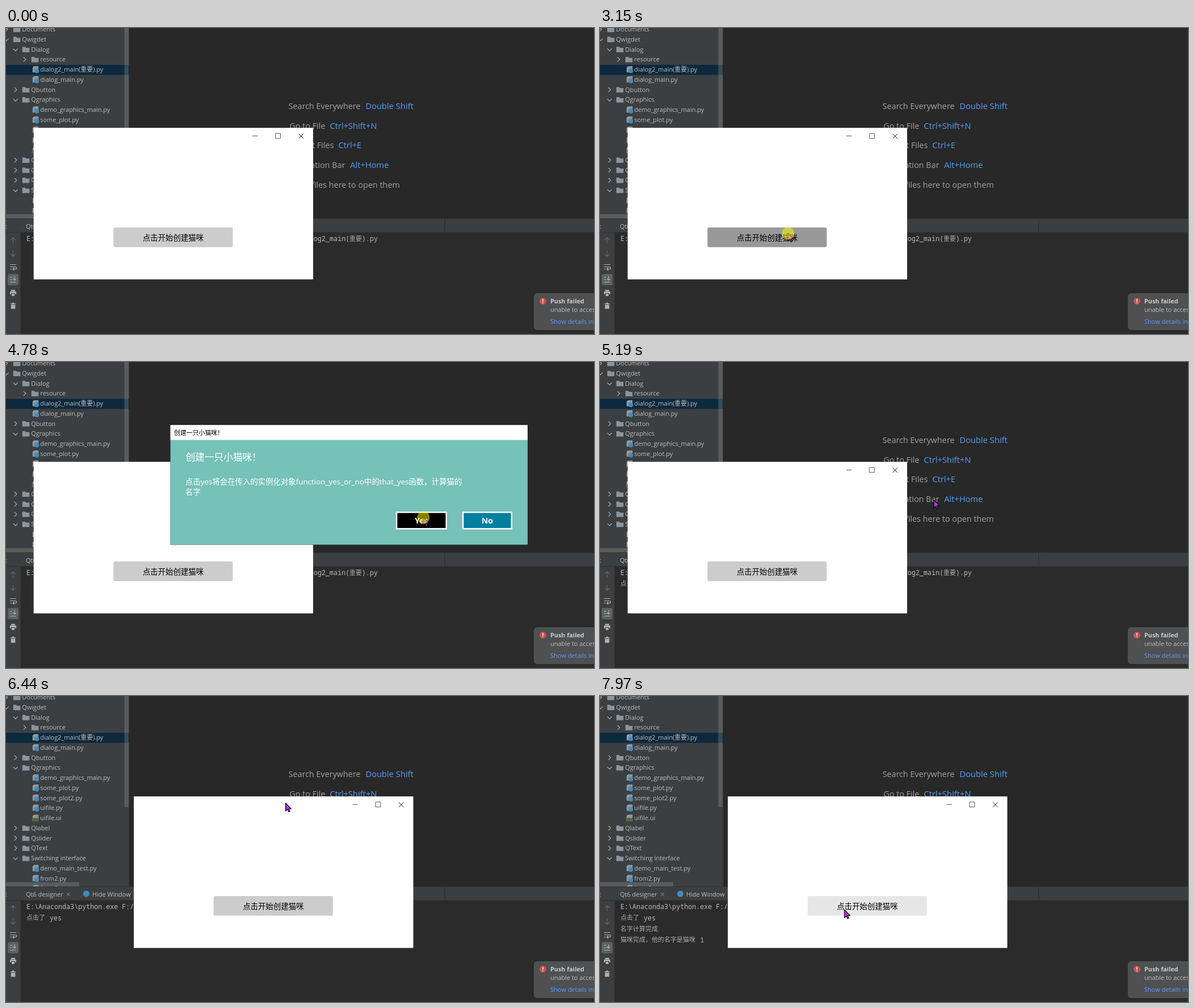
An HTML page that plays this animation: 1036x540 px, repeating every 8000 ms.

```html
<!DOCTYPE html>
<html lang="zh">
<head>
<meta charset="utf-8">
<style>
html, body { margin: 0; height: 100%; overflow: hidden; background: #282828; }
svg { display: block; width: 1036px; height: 540px; font-family: "Open Sans", "Noto Sans CJK SC", "Noto Sans CJK", sans-serif; }
text { white-space: pre; }
.mono { font-family: "Noto Sans Mono", "Noto Sans CJK SC", monospace; }
.bold { font-weight: 700; }
.end { text-anchor: end; }
.mid { text-anchor: middle; }
.line { fill: none; stroke: #afb1b3; stroke-width: 1.2; }
#ghost { mix-blend-mode: difference; }
</style>
</head>
<body>
<svg id="stage" viewBox="0 0 1036 540"></svg>
<script>
const rect = (x, y, w, h, fill, more = '') =>
  `<rect x="${x}" y="${y}" width="${w}" height="${h}" fill="${fill}" ${more}/>`;
const path = (d, fill, more = '') => `<path d="${d}" fill="${fill}" ${more}/>`;
const line = (d, more = '') => `<path d="${d}" class="line" ${more}/>`;
// y is the vertical middle of the line
const text = (x, y, s, size = 10.95, fill = '#bbb', cls = '') =>
  `<text x="${x}" y="${y + size * .36}" font-size="${size}" fill="${fill}" class="${cls}">${s}</text>`;

// Project tree: [level, kind, label]; v/> are open/closed folders
const rows = [
  [0, '>', 'Documents'], [0, 'v', 'Qwigdet'], [1, 'v', 'Dialog'], [2, '>', 'resource'],
  [2, 'py', 'dialog2_main(重要).py'], [2, 'py', 'dialog_main.py'], [1, '>', 'Qbutton'],
  [1, 'v', 'Qgraphics'], [2, 'py', 'demo_graphics_main.py'], [2, 'py', 'some_plot.py'],
  [2, 'py', 'some_plot2.py'], [2, 'py', 'uifile.py'], [2, 'ui', 'uifile.ui'],
  [1, '>', 'Qlabel'], [1, '>', 'Qslider'], [1, '>', 'QText'], [1, 'v', 'Switching interface'],
  [2, 'py', 'demo_main_test.py'], [2, 'py', 'from2.py'], [2, 'py', 'from3.py']
];

function treeRow([level, kind, label], i) {
  const x = 28.3 + level * 16, y = 2.3 + i * 17.75;
  let icon;
  if (kind.length === 1) {
    const cx = x - 28;
    icon = path(`M${x - 15.5} ${y - 4.5}h5l1.5 1.8h6v7.7h-12.5z`, '#8b959d') +
      line(kind === 'v' ? `M${cx - 3.5} ${y - 1.5}l4 4 4-4` : `M${cx - 1.5} ${y - 4}l4 4-4 4`);
  } else {
    icon = path(`M${x - 10} ${y - 6}h7v11h-10.5v-7.5z`, '#8b959d') +
      path(`M${x - 13.5} ${y - 3}l3-3v3z`, '#b4bcc2') +
      (kind === 'py' ? `<circle cx="${x - 6}" cy="${y + 2.5}" r="4" fill="#3e8cc0"/>`
        : rect(x - 14.5, y, 12, 6, '#4f6b3c'));
  }
  return icon + text(x, y, label);
}

const hints = [
  [624.5, 633.5, 'Search Everywhere', 'Double Shift'], [562.5, 570.5, 'Go to File', 'Ctrl+Shift+N'],
  [577.5, 585.5, 'Recent Files', 'Ctrl+E'], [597.5, 606.3, 'Navigation Bar', 'Alt+Home'],
  [693.8, 0, 'Drop files here to open them', '']
].map(([end, start, label, keys], i) =>
  text(end, 138 + i * 34.6, label, 14.35, '#a2a2a2', 'end') +
  text(start, 138 + i * 34.6, keys, 14.7, '#589df6')).join('');

// Scroll bars are translucent, so the selected row shows through
const bar = 'fill-opacity=".28"';
const tree = rect(0, 0, 217, 337, '#3c3f41') + rect(0, 65, 217, 17.7, '#0d293e') +
  rows.map(treeRow).join('') +
  rect(208.5, 0, 7.5, 196, '#a6a6a6', bar) + rect(0, 328.5, 129, 7.5, '#a6a6a6', bar);

const tools = rect(0, 336.5, 1036, 204, '#2b2b2b') + rect(0, 336.5, 1036, 24, '#3c3f41') +
  rect(0, 336, 1036, 1, '#323232') + rect(772.5, 337, 1, 23.5, '#2b2b2b') +
  rect(0, 361, 25.5, 179, '#3c3f41') + rect(0, 360.5, 1036, .8, '#323232') +
  text(-1, 350, ':') + '<circle cx="29.5" cy="353" r="1.5" fill="#1f5a2c"/>' +
  text(35, 350, 'Qt6 designer') + line('M107 347l6 6m0-6l-6 6', 'opacity=".45"') +
  '<circle cx="141.5" cy="349" r="5.5" fill="#3e8cc0"/>' + text(152, 350, 'Hide Window') +
  line('M12.5 380v-10m-4 4l4-4 4 4M12.5 393v10m-4-4l4 4 4-4', 'opacity=".35"') +
  line('M7 417.5h11M7 421.5h9.5q2 0 2 2t-2 2h-4m2-2.5l-2.5 2.5 2.5 2.5M7 425.5h3', 'stroke-width="1.5"') +
  rect(3, 434, 19, 20, '#5c6164', 'rx="3"') +
  line('M7 440h4M7 444h4M7 448.5h11M15 438v7m-2.7-2.5l2.7 2.7 2.7-2.7') +
  path('M9 462h7v2.5h-7zM7 465h11v5h-2v-2h-7v2h-2zM10 469h5v4h-5z', '#afb1b3') +
  path('M8 486h9v1.5h-9zM11 484.5h3v1.5h-3zM8.7 488.5h7.6v7h-7.6z', '#afb1b3');

const mono = (x, y, s) => text(x, y, s, 11.7, '#bbb', 'mono');
const han = (x, y, s) => text(x, y, s, 11, '#aaa');
const log = mono(36, 372, 'E:\\Anaconda3\\python.exe F:/') + mono(514, 372, 'dialog2_main(') +
  han(605, 372, '重要') + mono(627, 372, ').py') +
  `<g id="yesLog">${han(36, 391.5, '点击了') + mono(77, 391.5, 'yes')}</g>` +
  `<g id="nameLog">${han(36, 411, '名字计算完成') + han(36, 430.5, '猫咪完成，他的名字是猫咪') + mono(176.5, 430.5, '1')}</g>`;

const notice = rect(930, 468, 120, 65, '#4e5052', 'rx="6"') +
  '<circle cx="946" cy="482" r="6" fill="#c75450"/>' + rect(945.2, 478.3, 1.6, 4.5, '#eee') +
  rect(945.2, 484, 1.6, 1.6, '#eee') + text(959, 482, 'Push failed', 10.8, '#ccc', 'bold') +
  text(959, 497, 'unable to access') + text(959, 518.5, 'Show details in', 11, '#589df6');

const win = `<g id="win">${rect(48.7, 176.2, 492.4, 267.4, '#fff') +
  path('M434 190.5h9.5M474.7 186.1h8.8v8.8h-8.8z', 'none', 'stroke="#444" stroke-width=".9"') +
  path('M515.6 186.6l8.6 8.6m0-8.6l-8.6 8.6', 'none', 'stroke="#111"') +
  rect(189.3, 352, 210.2, 34.7, '#ccc', 'rx="3" id="create"') +
  text(294.5, 370, '点击开始创建猫咪', 13.4, '#000', 'mid')}</g>`;

const button = (x, w, label, id) =>
  rect(x + 1.2, 265.2, w - 2.4, 29, '#007f9f', `stroke="#fff" stroke-width="2.5" id="${id}"`) +
  text(x + w / 2, 280, label, 14, '#fff', 'mid bold');
const dialog = `<g id="dialog">${rect(289.5, 111.3, 629.5, 211.3, '#76c1b8') +
  rect(289.5, 111.3, 629.5, 26.2, '#fff') +
  path('M289.7 111v211.4H919', 'none', 'stroke="#000" stroke-opacity=".35" stroke-width=".7"') +
  text(296, 125, '创建一只小猫咪！', 10.9, '#000') +
  text(316.5, 167.5, '创建一只小猫咪！', 16.7, '#fff') +
  text(316, 211, '点击yes将会在传入的实例化对象function_yes_or_no中的that_yes函数，计算猫的', 13.4, '#fff') +
  text(316, 229, '名字', 13.4, '#fff') +
  button(687, 90, 'Yes', 'yes') + button(804, 88, 'No', 'no')}</g>`;

const ghost = rect(50, 177.5, 489.6, 264.7, 'none', 'stroke="#fff" stroke-width="2.7" id="ghost"');
const pointer = `<g id="pointer">${path('M0 0V14L3.3 11 5.6 15.6 7.8 14.6 5.6 10.2H10Z', '#bf30f0',
  'stroke="#000" stroke-width="1.1" stroke-linejoin="round"')}
  <circle id="press" cx=".3" cy=".3" r="11" fill="#ff0" opacity=".5"/></g>`;

stage.innerHTML = rect(0, 0, 1036, 540, '#282828') + hints + tree + tools + log + notice +
  win + dialog + ghost + pointer;

const el = id => document.getElementById(id);
const show = (id, on) => el(id).setAttribute('display', on ? 'inline' : 'none');
const move = (id, x, y) => el(id).setAttribute('transform', `translate(${x} ${y})`);

// Pointer way points: time, x, y
const way = [
  [130, 937, 528], [830, 331, 362], [3610, 331, 362], [4380, 707, 284], [4520, 735, 274],
  [4850, 735, 274], [5700, 320, 188], [6020, 320, 188], [6090, 339.5, 188], [6370, 492.5, 189],
  [6710, 492.5, 189], [7080, 420, 368], [7480, 300, 419], [7620, 286, 424], [7970, 430.7, 377.3]
];

function pointerAt(t) {
  const i = way.findIndex(p => p[0] > t);
  if (i < 1) return (i ? way[way.length - 1] : way[0]).slice(1);
  const [t0, x0, y0] = way[i - 1], [t1, x1, y1] = way[i];
  const k = (t - t0) / (t1 - t0), e = k * k * (3 - 2 * k);
  return [x0 + (x1 - x0) * e, y0 + (y1 - y0) * e];
}

function draw(t) {
  const within = (a, b) => t >= a && t < b;
  const [x, y] = pointerAt(t);
  const moved = t >= 6440, [dx, dy] = moved ? [176.5, 1] : [0, 0];
  const open = within(3350, 4850);
  const press = within(3150, 3280) || within(4780, 4850) || within(5750, 6440);
  const over = (l, top, w, h) => t >= 130 && x >= l && x <= l + w && y >= top && y <= top + h;

  show('pointer', t >= 130);
  move('pointer', x, y);
  show('press', press);
  move('win', dx, dy);
  show('dialog', open);
  show('ghost', within(6090, 6440));
  move('ghost', 19 + Math.max(0, x - 339.5) * 157.5 / 153, 0);
  show('yesLog', t >= 4850);
  show('nameLog', t >= 6990);
  const hot = !open && over(189 + dx, 352 + dy, 210, 35);
  el('create').setAttribute('fill', !hot ? '#ccc' : press ? '#999' : '#e6e6e6');
  const hotYes = open && over(687, 264, 90, 32);
  el('yes').setAttribute('fill', !hotYes ? '#007f9f' : press ? '#000' : '#2f9ab5');
}

const start = performance.now();
function tick() {
  draw((performance.now() - start) % 8000);
  requestAnimationFrame(tick);
}
tick();
</script>
</body>
</html>
```
